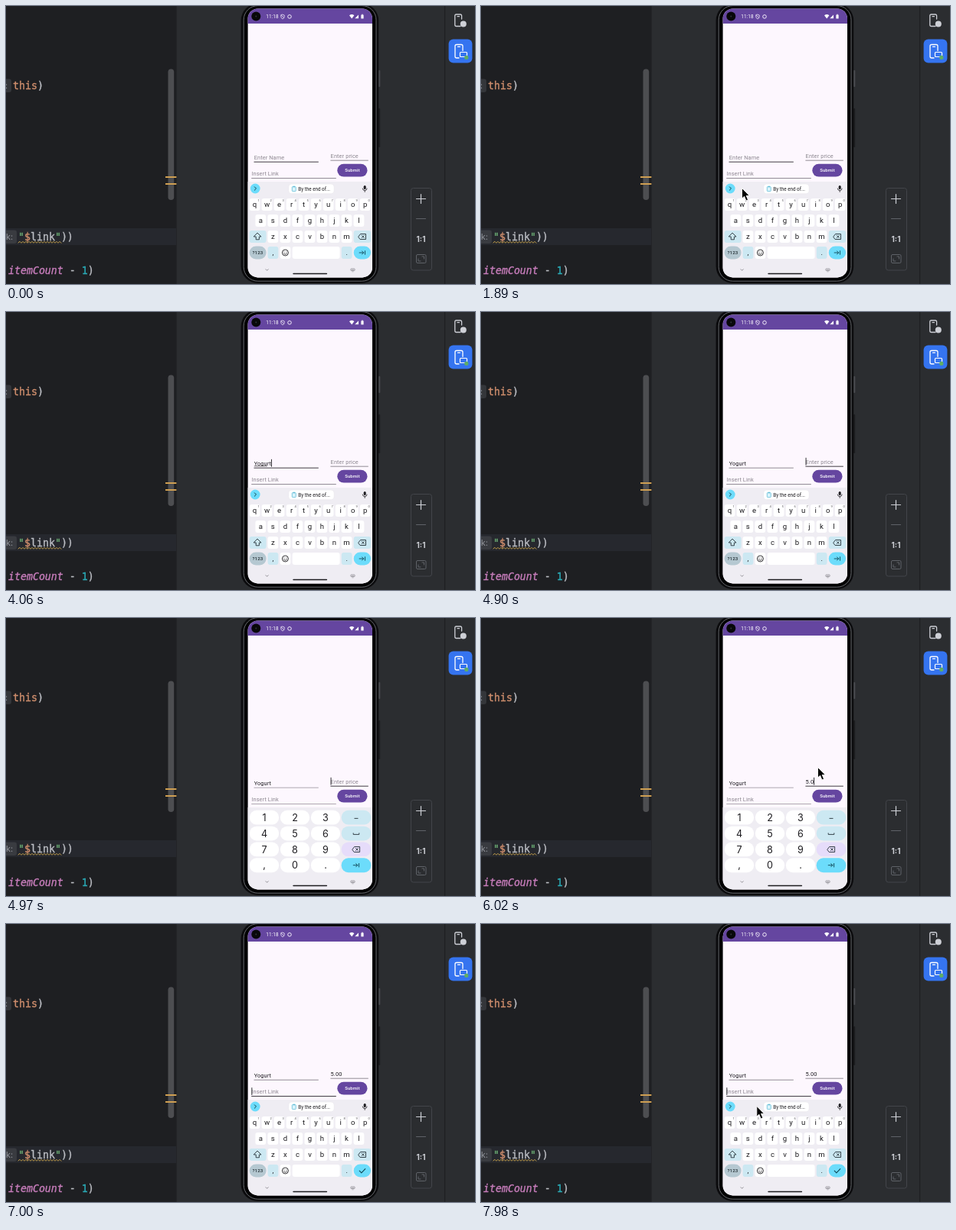
Animation, 612 px wide and 364 px high, one loop 8000 ms. Source, as an HTML page:

```html
<!DOCTYPE html>
<html lang="en">
<head>
<meta charset="utf-8">
<title>Form entry on a phone emulator</title>
<style>
html, body { margin: 0; width: 100%; height: 100%; overflow: hidden; background: #2b2d30; }
svg { display: block; width: 612px; height: 364px; }
text { font-family: Roboto, Arial, sans-serif; white-space: pre; }
.code { font: 13.25px "DejaVu Sans Mono", monospace; stroke-width: .35px; }
.hint { font: 10.8px Inter, sans-serif; fill: #91949b; }
.field { font-size: 7.4px; letter-spacing: .1px; }
.mid { text-anchor: middle; }
.digit { font-family: Inter, sans-serif; }
.line { fill: none; stroke-linecap: round; stroke-linejoin: round; }
</style>
</head>
<body>
<svg id="stage" viewBox="0 0 612 364"></svg>
<script>
const NS = "http://www.w3.org/2000/svg";
const stage = document.getElementById("stage");
const INK = "#1c1b1f", PALE = "#cce8f2", CYAN = "#6cdcfb", LOOP = 8000;

function add(parent, tag, attrs, text) {
  const el = document.createElementNS(NS, tag);
  for (const k in attrs) el.setAttribute(k, attrs[k]);
  if (text !== undefined) el.textContent = text;
  return parent.appendChild(el);
}
const group = (parent, attrs) => add(parent, "g", attrs);
const rect = (p, x, y, width, height, fill, rx = 0, more) =>
  add(p, "rect", { x, y, width, height, fill, rx, ...more });
const circle = (p, cx, cy, r, fill, more) => add(p, "circle", { cx, cy, r, fill, ...more });
const line = (p, d, stroke, width = 1, more) =>
  add(p, "path", { d, class: "line", stroke, "stroke-width": width, ...more });
const label = (p, x, cy, size, text, fill = INK, more) =>
  add(p, "text", { x, y: cy + size * 0.355, "font-size": size, class: "mid", fill, ...more }, text);
const show = (el, on) => el.setAttribute("visibility", on ? "visible" : "hidden");

function codeLine(x, y, parts) {
  const t = add(stage, "text", { x, y, class: "code" });
  for (const [text, fill, style = "normal"] of parts)
    add(t, "tspan", { fill, stroke: fill, "font-style": style }, text);
}

function drawEditor() {
  rect(stage, 0, 0, 222, 364, "#1e1f22");
  rect(stage, 0, 291, 222, 22, "#26282e");
  rect(stage, 222, 0, 1, 364, "#232427");
  rect(stage, -8, 95.5, 15, 17.5, "#34363a", 3);
  add(stage, "text", { x: -1, y: 108, class: "hint" }, ":");
  codeLine(9, 108.5, [["this", "#cf8e6d"], [")", "#bcbec4"]]);
  rect(stage, -8, 293.5, 22, 17.5, "#393b40", 3);
  add(stage, "text", { x: 0, y: 306, class: "hint" }, "k:");
  codeLine(16, 306.8, [['"', "#6aab73"], ["$", "#cf8e6d"], ["link", "#bcbec4"], ['"', "#6aab73"], ["))", "#bcbec4"]]);
  let wave = "M16 310";
  for (let x = 18; x <= 72; x += 2) wave += `L${x} ${x % 4 ? 308.3 : 310.3}`;
  line(stage, wave, "#c29e4a", 1);
  codeLine(3, 350.8, [["itemCount", "#c77dbb", "italic"], [" - ", "#bcbec4"], ["1", "#2aacb8"], [")", "#bcbec4"]]);
  rect(stage, 211.5, 82.5, 7.7, 171.5, "#4d4e51", 3.8);
  for (const y of [223, 232]) rect(stage, 208, y, 14.4, 2, "#cf9f52");
}

function drawTools() {
  rect(stage, 572, 0, 1.2, 364, "#1e1f22");
  line(stage, "M593 26.5H587.5Q585.8 26.5 585.8 24.5V13Q585.8 11 587.5 11H592.8Q594.6 11 594.6 13V17M589 13.7H591.5", "#ced0d6", 1.3);
  circle(stage, 596.8, 23.5, 4, "#ced0d6");

  rect(stage, 577.6, 43.6, 30.8, 30.8, "#3574f0", 6);
  line(stage, "M591 68H588Q586 68 586 66V52.5Q586 50.5 588 50.5H594Q596 50.5 596 52.5V58.5M589.5 53.3H592.5", "#fff", 1.3);
  rect(stage, 592.5, 60.5, 9, 6, "none", 1, { stroke: "#fff", "stroke-width": 1.2 });
  circle(stage, 600.8, 67.4, 2.6, "#5fad65");

  rect(stage, 528.5, 238.5, 27, 107.5, "#2b2d30", 3, { stroke: "#43454a" });
  line(stage, "M535.5 252.5H547.5M541.5 246.5V258.5", "#ced0d6", 1.2);
  line(stage, "M535.5 278.5H547.5", "#5f6268", 1.2);
  label(stage, 541.5, 305, 10, "1:1", "#ced0d6", { "font-weight": 700, style: "font-family:Inter,sans-serif" });
  rect(stage, 535.5, 325.5, 12.5, 11, "none", 1.5, { stroke: "#5f6268" });
  line(stage, "M538 331V334H541M543 328H545.5V331", "#5f6268");
}

function drawPhone() {
  rect(stage, 486, 84, 2.3, 22, "#4a4c50", 1);
  rect(stage, 486, 134, 2.2, 51, "#1b1c1e", 1);
  rect(stage, 306.6, -3.2, 179.6, 366.2, "#0c0c0e", 22);
  rect(stage, 310.2, -0.4, 172.8, 360.6, "#020203", 18.5, { stroke: "#66686c", "stroke-width": 1 });
  const clip = add(add(stage, "defs", {}), "clipPath", { id: "screen" });
  rect(clip, 315.6, 3.4, 162.4, 352, "#fff", 13);
  const s = group(stage, { "clip-path": "url(#screen)" });
  rect(s, 315, 3, 164, 353, "#fdf7fe");
  rect(s, 315, 3, 164, 20, "#6546a0");
  circle(s, 326.3, 13.6, 6, "#08080a");
  circle(s, 326.3, 13.6, 1, "#30343c");
  line(s, "M361 11.2L363.2 12V14.2Q363 16 361 17Q359 16 358.8 14.2V12ZM359.4 12.2L362.7 15.6", "#efe8f8", 0.8);
  circle(s, 370, 13.9, 2.3, "none", { stroke: "#efe8f8", "stroke-width": 1 });
  add(s, "path", { d: "M448 12.2Q451.2 9.8 454.4 12.2L451.2 16.4ZM455.3 16.3H460V11.4Z", fill: "#fff" });
  rect(s, 463.4, 11.4, 3.2, 5.2, "#fff", 0.5);
  rect(s, 464.3, 10.7, 1.4, 1, "#fff");
  return s;
}

const backspace = (p, x, y) =>
  line(p, `M${x - 5} ${y}L${x - 2.4} ${y - 3.5}H${x + 4.6}V${y + 3.5}H${x - 2.4}ZM${x - 0.6} ${y - 1.5}l3 3m0 -3l-3 3`, "#253238", 0.9);
const tabArrow = (p, x, y) =>
  line(p, `M${x - 3.8} ${y}H${x + 1.8}M${x - 0.3} ${y - 2.1}L${x + 1.8} ${y}L${x - 0.3} ${y + 2.1}M${x + 3.6} ${y - 2.3}V${y + 2.3}`, "#0f4654", 0.9);

function drawLetters(p) {
  rect(p, 315, 230, 164, 126, "#efedf3");
  circle(p, 325.2, 239, 6.4, CYAN);
  line(p, "M324.3 236.8L326.5 239L324.3 241.2", "#12414c", 1);
  rect(p, 368.7, 233, 59.5, 12.8, "#fff", 4, { stroke: "#e2e0e7", "stroke-width": 0.5 });
  rect(p, 373.3, 236.6, 5, 6, "#d9f4fc", 0.8, { stroke: "#62bdd6", "stroke-width": 0.8 });
  rect(p, 374.7, 235.7, 2.2, 1.6, "#62bdd6");
  add(p, "text", { x: 381.3, y: 241.6, "font-size": 6.3, fill: INK }, "By the end of...");
  rect(p, 466.7, 235, 3, 5, INK, 1.5);
  line(p, "M465.3 239Q465.5 241.6 468.2 241.6T471.1 239M468.2 241.8V243.4", INK, 0.8);

  const key = (x, y, ch) => {
    rect(p, x - 6.9, y - 8, 13.8, 16, "#fff", 3);
    label(p, x, y - 0.2, 9.6, ch);
  };
  [..."qwertyuiop"].forEach((ch, i) => {
    const x = 324.5 + i * 16.02;
    key(x, 260, ch);
    label(p, x + 5, 254.9, 4, (i + 1) % 10, "#55535a");
  });
  [..."asdfghjkl"].forEach((ch, i) => key(332.3 + i * 16.02, 281, ch));
  [..."zxcvbnm"].forEach((ch, i) => key(348.4 + i * 16.02, 302, ch));

  rect(p, 317.6, 294, 22, 16, PALE, 3);
  line(p, "M328.3 297.3L333 302H330.4V305.8H326.2V302H323.6Z", "#253238", 0.9);
  rect(p, 453.7, 294, 22.4, 16, PALE, 3);
  backspace(p, 464.9, 302);

  rect(p, 317.6, 314.6, 22, 17, "#b5c8d1", 8.5);
  label(p, 328.4, 323, 6.2, "?123", "#253238", { "font-weight": 500 });
  rect(p, 341.6, 315, 13.8, 16, PALE, 3);
  label(p, 348.4, 323, 9, ",");
  rect(p, 357.6, 315, 13.8, 16, "#fff", 3);
  circle(p, 364.4, 323, 4, "none", { stroke: INK, "stroke-width": 0.9 });
  circle(p, 363, 322, 0.6, INK);
  circle(p, 365.8, 322, 0.6, INK);
  line(p, "M362.4 324.2Q364.4 326.6 366.4 324.2", INK, 0.8);
  rect(p, 373.6, 315, 62, 16, "#fff", 3);
  rect(p, 437.8, 315, 13.8, 16, PALE, 3);
  label(p, 444.7, 323, 9, ".");
  rect(p, 453.7, 314.6, 22.4, 17, CYAN, 8.5);
}

function drawDigits(p) {
  rect(p, 315, 248, 164, 108, "#efedf3");
  ["123", "456", "789", ",0."].forEach((row, r) => {
    const y = 261.2 + r * 20.85;
    [...row].forEach((ch, c) => {
      const x = 337 + c * 40;
      rect(p, x - 19.1, y - 9.4, 38.2, 18.8, "#fff", 9);
      label(p, x, y + 0.2, 12.6, ch, INK, { class: "mid digit" });
    });
    rect(p, 437.7, y - 9.4, 38.6, 18.8, [PALE, PALE, "#e6dcfa", CYAN][r], 9);
  });
  line(p, "M454.9 262.4H459.1", "#253238", 0.9);
  line(p, "M453.2 281.8V283.4H460.8V281.8", "#253238", 0.9);
  backspace(p, 457, 303);
  tabArrow(p, 457, 323.7);
}

drawEditor();
drawTools();
const screen = drawPhone();
const clock = add(screen, "text", { x: 339.3, y: 16.3, "font-size": 6.4, fill: "#fff", "letter-spacing": 0.1 });

const form = group(screen);
const fields = [
  { x: 323.7, end: 408, base: 200.8, bar: 203.7, hint: "Enter Name" },
  { x: 423.6, end: 473, base: 198.8, bar: 201.7, hint: "Enter price" },
  { x: 320.4, end: 431, base: 222.2, bar: 225, hint: "Insert Link" }
].map(f => ({
  ...f,
  text: add(form, "text", { x: f.x, y: f.base, class: "field" }),
  rule: rect(form, f.x - 0.2, f.bar, f.end - f.x, 0.9, INK)
}));
const composing = rect(form, 323.8, 201.5, 0, 0.7, "#333");
const caret = rect(form, 0, 0, 0.9, 9.8, INK);
rect(form, 432.3, 206.8, 39.2, 16.8, "#6546a0", 8.4);
label(form, 452, 215.2, 5.9, "Submit", "#fff", { "font-weight": 500, "letter-spacing": 0.15 });

const letters = group(screen), digits = group(screen);
drawLetters(letters);
drawDigits(digits);
const next = group(letters), done = group(letters);
tabArrow(next, 464.9, 323);
line(done, "M461.2 323.2L463.8 325.8L468.8 320.6", "#0f4654", 1.1);

line(screen, "M339 344.7L340.6 346.3L342.2 344.7", "#77757c", 0.8);
rect(screen, 374.3, 349.8, 44.8, 1.5, INK, 0.7);
rect(screen, 449.9, 344, 5.2, 2.5, "none", 0.5, { stroke: "#85838a", "stroke-width": 0.7 });
line(screen, "M451.2 345.3H453.8M451.8 347.8H453.2", "#85838a", 0.6);

const pointer = add(stage, "path", {
  d: "M0 0V13.6L3.1 10.8L5.4 16.4L8 15.3L5.7 9.9H9.8Z",
  fill: "#000", stroke: "#fff", "stroke-width": 0.9, "stroke-linejoin": "round"
});

// Each track lists [start time, value].
const at = (track, t) => track.reduce((v, [start, value]) => (t >= start ? value : v), null);
const name = [[0, ""], [1960, "Y"], [2100, "Yo"], [3360, "Yog"], [3500, "Yogu"], [3640, "Yogur"], [3780, "Yogurt"]];
const price = [[0, ""], [5670, "5"], [5880, "5."], [6020, "5.0"], [6160, "5.00"]];
const marked = [[0, 0], [2240, 1], [2520, 2], [3640, 4], [4130, 6], [4830, 0]];
const blink = [[0, 0], [280, 1], [770, 0], [1330, 1], [1890, 0], [1960, 1], [3010, 0], [3360, 1], [4550, 0],
  [4830, 1], [5390, 0], [5670, 1], [6650, 0], [6860, 1], [7490, 0], [7980, 1]];
const focus = [[0, 0], [4830, 1], [6860, 2]];
const numeric = [[0, false], [4970, true], [7000, false]];
const mouse = [[560, [340.5, 238.5]], [4060, null], [5250, [439.5, 195.5]], [6160, [448.5, 211.5]],
  [6300, null], [7280, [359.8, 238.5]]];

function render(t) {
  const active = at(focus, t), num = at(numeric, t);
  const values = [at(name, t), at(price, t), ""];
  fields.forEach((f, i) => {
    f.text.textContent = values[i] || f.hint;
    f.text.setAttribute("fill", values[i] ? INK : "#8d8890");
    f.rule.setAttribute("fill", i === active ? "#2b292e" : num ? "#a5a0a8" : "#858088");
  });
  const f = fields[active], value = values[active];
  const width = value ? f.text.getComputedTextLength() : 0;
  caret.setAttribute("x", f.x + width);
  caret.setAttribute("y", f.base - 8);
  show(caret, at(blink, t));
  const count = at(marked, t);
  composing.setAttribute("width", count ? fields[0].text.getSubStringLength(0, Math.min(count, values[0].length)) : 0);
  form.setAttribute("transform", `translate(0 ${num ? 18 : 0})`);
  letters.setAttribute("display", num ? "none" : "inline");
  digits.setAttribute("display", num ? "inline" : "none");
  next.setAttribute("display", active === 2 ? "none" : "inline");
  done.setAttribute("display", active === 2 ? "inline" : "none");
  clock.textContent = t < 7420 ? "11:18" : "11:19";
  const pos = at(mouse, t);
  show(pointer, pos);
  if (pos) pointer.setAttribute("transform", `translate(${pos})`);
}

const begin = performance.now();
function tick() {
  render((performance.now() - begin) % LOOP);
  requestAnimationFrame(tick);
}
tick();
</script>
</body>
</html>
```
